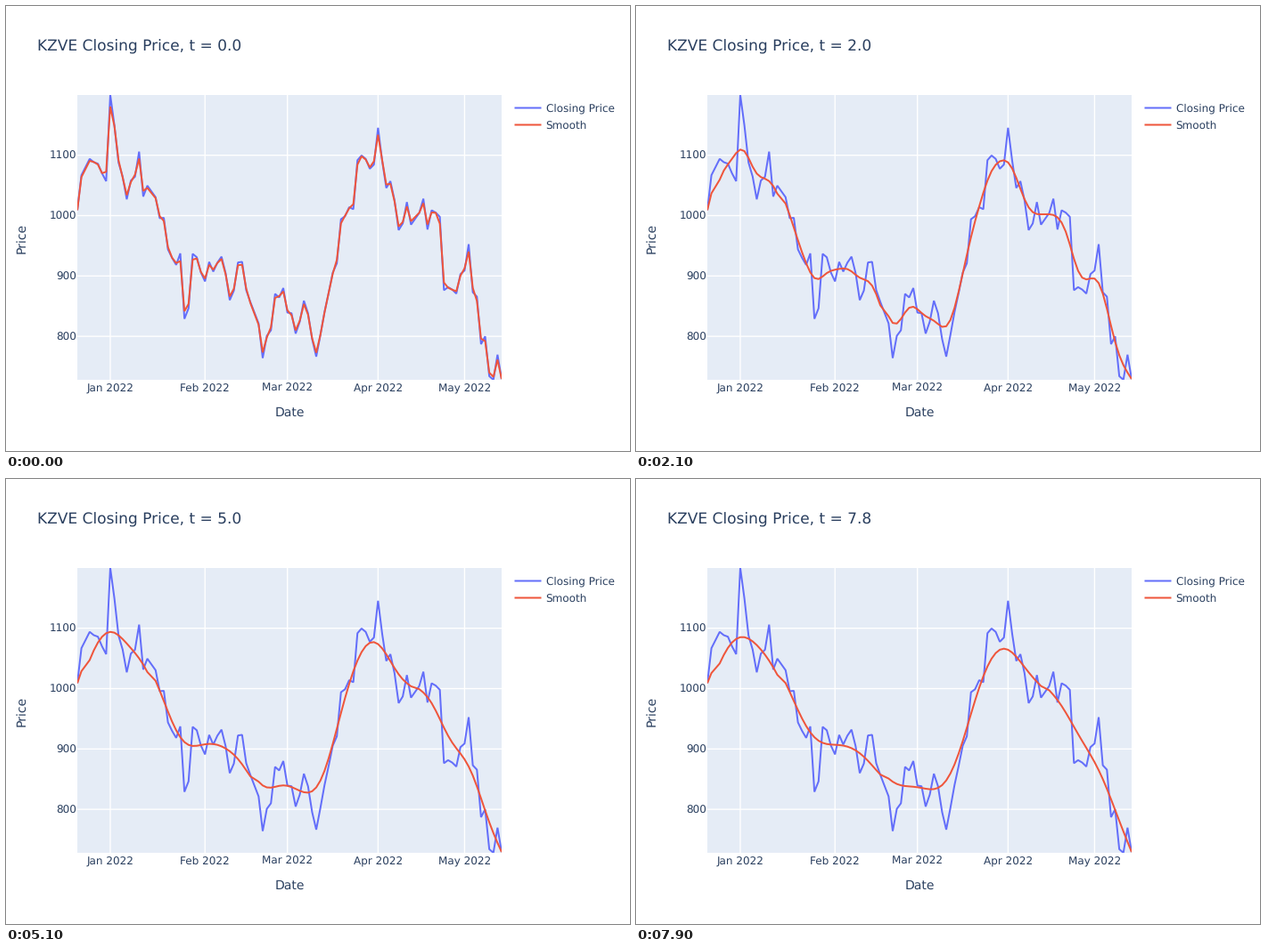
A matplotlib script that plays this animation: 700 px wide and 500 px high, repeating every 8 s.

```python
import numpy as np
import matplotlib.pyplot as plt
from matplotlib.animation import FuncAnimation
from matplotlib.patches import Rectangle

W, H, DPI = 700, 500, 100
PX = 72 / DPI
LEFT, RIGHT, TOP, BOTTOM = 80, 556, 100, 420
INK, BLUE, RED, PANEL = "#2a3f5f", "#636efa", "#ef553b", "#e5ecf6"
FRAMES, INTERVAL = 80, 100
RATE = 0.1
DAYS = 104                      # weekdays along the x axis
HOLIDAYS = (2, 18, 43, 82)      # weekdays without a price

PRICES = np.array([
    1009, 1067, 1094, 1088.5, 1086, 1070, 1057, 1200, 1149.6, 1088,
    1064.7, 1027, 1058, 1064.4, 1106, 1031.6, 1049.6, 1030.5, 995.7, 996.3,
    944, 930, 918.4, 937.4, 829, 846.4, 936.7, 931, 905.7, 891,
    923.3, 907.3, 922, 932, 904.6, 860, 875.8, 922.4, 923.4, 876.4,
    857, 821.5, 764, 800.8, 810, 870.4, 864.4, 880, 839.3, 838.3,
    804.6, 824.4, 859, 838.3, 795.4, 766.4, 802, 840, 871.6, 905.4,
    921, 994, 999, 1014, 1010.6, 1091.8, 1099.6, 1094, 1077.6, 1084.6,
    1145.5, 1091, 1045.8, 1057, 1025.5, 976, 987, 1022.4, 985, 1004.3,
    1028, 977, 1008.8, 1005, 998, 876.4, 881.5, 877.5, 870.8, 903,
    909, 952.6, 873, 865.7, 787, 800, 734, 728, 769.6, 729.3])


def x_px(day):
    return LEFT + (RIGHT - LEFT) * np.asarray(day) / (DAYS - 1)


def y_px(price):
    return BOTTOM - (np.asarray(price) - 728) * (BOTTOM - TOP) / 471.8


def smooth(values, steps):
    """Explicit heat diffusion with both ends held fixed."""
    u = values.astype(float).copy()
    for _ in range(steps):
        u[1:-1] += RATE * (u[2:] - 2 * u[1:-1] + u[:-2])
    return u


plt.rcParams.update({"font.family": "DejaVu Sans", "text.hinting": "none",
                     "path.simplify": False})
fig = plt.figure(figsize=(W / DPI, H / DPI), dpi=DPI, facecolor="white")
ax = fig.add_axes([0, 0, 1, 1])
ax.set_xlim(0, W)
ax.set_ylim(H, 0)
ax.axis("off")


def label(x, y, text, size=12, **kw):
    kw.setdefault("va", "baseline")
    return ax.text(x, y, text, size=size * PX, color=INK, **kw)


def stroke(xs, ys, color, width=2, **kw):
    return ax.plot(xs, ys, color=color, lw=width * PX, snap=False,
                   solid_capstyle="butt", solid_joinstyle="bevel", **kw)[0]


panel = Rectangle((LEFT, TOP), RIGHT - LEFT, BOTTOM - TOP, fc=PANEL, lw=0)
ax.add_patch(panel)

months = {"Jan": 8, "Feb": 31, "Mar": 51, "Apr": 73, "May": 94}
for name, day in months.items():
    x = x_px(day)
    stroke([x, x], [TOP, BOTTOM], "white", 1.4)
    label(x, 433.3, f"{name} 2022", ha="center")
for price in (800, 900, 1000, 1100):
    y = y_px(price)
    stroke([LEFT, RIGHT], [y, y], "white", 1.4)
    label(79, y + 4.2, str(price), ha="right")

label(318, 461, "Date", 14, ha="center")
label(24, 260.5, "Price", 14, rotation=90, ha="right", va="center")
title = label(35, 50, "", 17)

for y, name, color in ((114.5, "Closing Price", BLUE), (133.5, "Smooth", RED)):
    stroke([570.5, 600.5], [y, y], color)
    label(605.5, y + 4.3, name)

days = x_px([d for d in range(DAYS) if d not in HOLIDAYS])
closing = stroke(days, y_px(PRICES), BLUE, zorder=3)
curve = stroke(days, y_px(PRICES), RED, zorder=4)
for line in (closing, curve):
    line.set_clip_path(panel)


def update(i):
    step = max(0, i - 1)
    curve.set_ydata(y_px(smooth(PRICES, step + 1)))
    title.set_text(f"KZVE Closing Price, t = {step / 10:.1f}")
    return curve, title


anim = FuncAnimation(fig, update, frames=FRAMES, interval=INTERVAL,
                     repeat=True, repeat_delay=0, blit=False)
plt.show()
```
